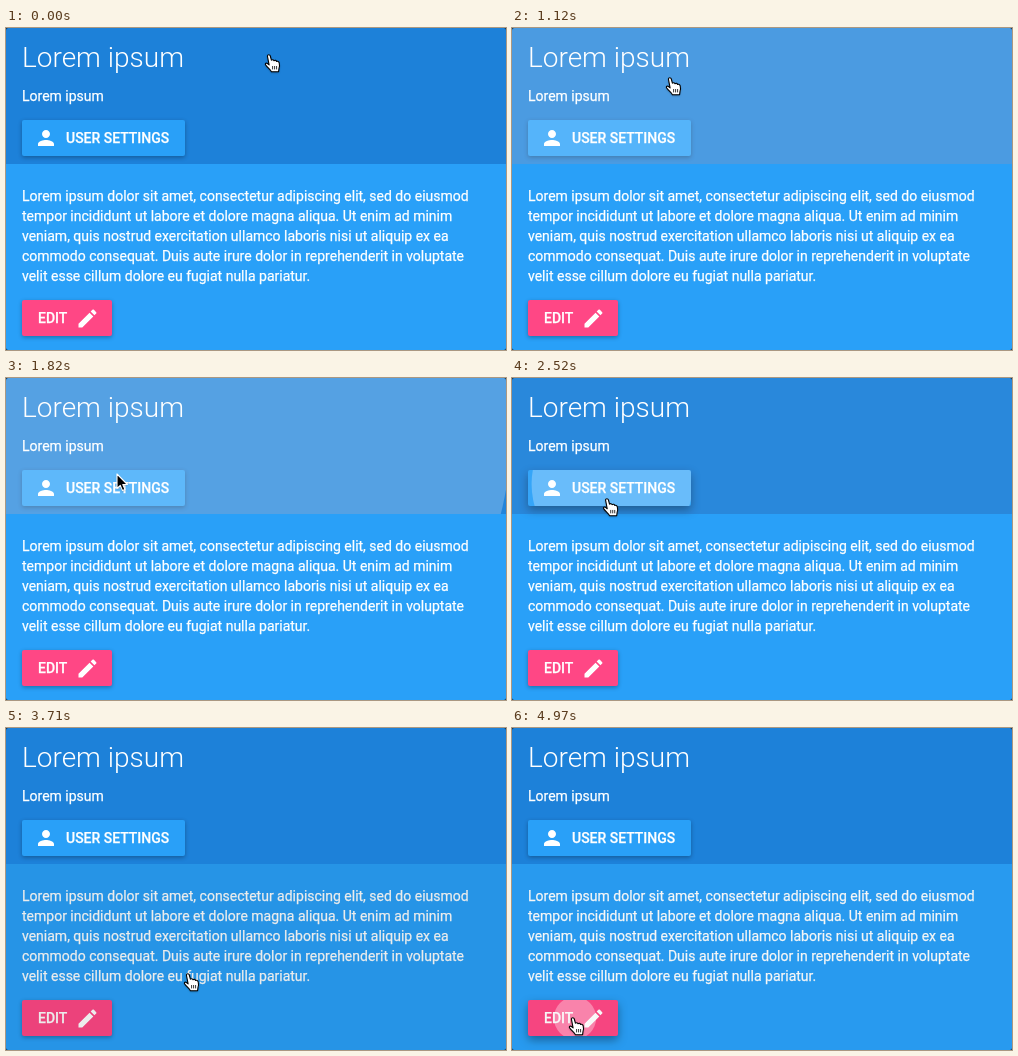
An HTML page with a canvas for the animation above (5.04 s loop, 500x322 px).

```html
<!DOCTYPE html>
<html lang="en">
<head>
<meta charset="utf-8">
<title>Ink ripples</title>
<style>
html, body { margin: 0; width: 500px; height: 322px; overflow: hidden; background: #16324a; }
canvas { display: block; }
</style>
</head>
<body>
<canvas id="stage" width="500" height="322"></canvas>
<script>
const ctx = document.getElementById('stage').getContext('2d');
const LOOP = 5040, STEP = 70, GROW = 650, FADE = 1500;

const header = { x: 0, y: 0, w: 500, h: 136, color: '#1d81d9' };
const body = { x: 0, y: 136, w: 500, h: 186, color: '#29a0f8' };
const userButton = { x: 16, y: 92, w: 163, h: 36, color: '#29a0f8' };
const editButton = { x: 16, y: 272, w: 90, h: 36, color: '#ff4785' };

const light = { rgb: '255,255,255', alpha: 0.38 };
const dark = { rgb: '0,0,0', alpha: 0.13 };
const clicks = [
  { at: 420, box: header, x: 257, y: 31, ink: light },
  { at: 1240, box: header, x: 156, y: 51, ink: light },
  { at: 2030, box: userButton, x: 100, y: 106, ink: light },
  { at: 3090, box: body, x: 84, y: 157, ink: dark },
  { at: 3869, box: body, x: 173, y: 247, ink: dark },
  { at: 4790, box: editButton, x: 63, y: 290, ink: light }
];

// Pointer tip: time, x, y
const path = [
  [0, 263, 27], [210, 257, 31], [420, 257, 31], [1120, 158, 50], [1300, 155, 51],
  [1820, 111, 96], [2030, 100, 106], [2300, 100, 106], [2900, 84, 155], [3150, 84, 155],
  [3600, 182, 246], [3710, 182, 246], [3869, 172, 246], [4130, 172, 246],
  [4700, 61, 290], [LOOP, 61, 290]
];

const person = new Path2D('M12 12c2.21 0 4-1.79 4-4s-1.79-4-4-4-4 1.79-4 4 1.79 4 4 4z' +
  'm0 2c-2.67 0-8 1.34-8 4v2h16v-2c0-2.66-5.33-4-8-4z');
const pencil = new Path2D('M3 17.25V21h3.75L17.81 9.94l-3.75-3.75L3 17.25zM20.71 7.04c.39-.39.39-1.02 0-1.41' +
  'l-2.34-2.34c-.39-.39-1.02-.39-1.41 0l-1.83 1.83 3.75 3.75 1.83-1.83z');
const hand = new Path2D('M-1.6 1C-1.4-.7 .9-.6 1.3 1L2.4 5.2C3.2 4.4 4.6 4.6 5 5.7C5.9 5 7.3 5.3 7.6 6.5' +
  'C8.7 6 9.9 6.6 10.2 7.9C10.7 10 10.7 11.6 10 13.4L9.6 16.8H2.4C1.9 14.8-1.5 12.6-3.3 10' +
  'C-4.4 8.4-2.6 7.5-1.3 8.7L.1 9.8Z');
const knuckles = new Path2D('M3.6 11V14.4M5.6 11V14.4M7.6 11V14.4');
const arrow = new Path2D('M0 0V14.5L3.3 11.4L5.5 16.6L8 15.5L5.8 10.5H10.4Z');

const paragraph = [
  'Lorem ipsum dolor sit amet, consectetur adipiscing elit, sed do eiusmod',
  'tempor incididunt ut labore et dolore magna aliqua. Ut enim ad minim',
  'veniam, quis nostrud exercitation ullamco laboris nisi ut aliquip ex ea',
  'commodo consequat. Duis aute irure dolor in reprehenderit in voluptate',
  'velit esse cillum dolore eu fugiat nulla pariatur.'
];

const clamp = v => Math.max(0, Math.min(1, v));

function write(text, x, y, size = 14, weight = 400) {
  ctx.font = `${weight} ${size}px Roboto, sans-serif`;
  ctx.fillStyle = '#fff';
  ctx.fillText(text, x, y);
  if (weight === 300) return;
  ctx.strokeStyle = '#fff';
  ctx.lineWidth = 0.25;
  ctx.strokeText(text, x, y);
}

function icon(shape, x, y) {
  ctx.save();
  ctx.translate(x, y);
  ctx.fillStyle = '#fff';
  ctx.fill(shape);
  ctx.restore();
}

function button(box, t) {
  const age = t - clicks.find(c => c.box === box).at;
  const lift = clamp(age / 150) * clamp((850 - age) / 150);
  ctx.save();
  ctx.shadowColor = `rgba(0,0,0,${0.3 + 0.06 * lift})`;
  ctx.shadowBlur = 4 + 6 * lift;
  ctx.shadowOffsetY = 1.5 + 2.5 * lift;
  ctx.fillStyle = box.color;
  ctx.beginPath();
  ctx.roundRect(box.x, box.y, box.w, box.h, 2);
  ctx.fill();
  ctx.restore();
}

function ripples(box, t) {
  ctx.save();
  ctx.beginPath();
  ctx.roundRect(box.x, box.y, box.w, box.h, box.h < 40 ? 2 : 0);
  ctx.clip();
  for (const { at, x, y, ink } of clicks.filter(c => c.box === box)) {
    const age = t - at;
    if (age <= 0 || age >= FADE) continue;
    const reach = Math.hypot(Math.max(x - box.x, box.x + box.w - x), Math.max(y - box.y, box.y + box.h - y));
    ctx.fillStyle = `rgba(${ink.rgb},${ink.alpha * (1 - age / FADE)})`;
    ctx.beginPath();
    ctx.arc(x, y, reach * Math.sin(clamp(age / GROW) * Math.PI / 2), 0, 7);
    ctx.fill();
  }
  ctx.restore();
}

function pointer(t) {
  const i = path.findIndex(p => p[0] > t);
  const [t0, x0, y0] = path[i - 1], [t1, x1, y1] = path[i];
  const u = (t - t0) / (t1 - t0), k = u * u * (3 - 2 * u);
  const isArrow = t >= 1720 && t < 1900;
  const shape = isArrow ? arrow : hand;
  ctx.save();
  ctx.translate(x0 + (x1 - x0) * k, y0 + (y1 - y0) * k);
  ctx.lineJoin = 'round';
  ctx.shadowColor = 'rgba(0,0,0,.35)';
  ctx.shadowBlur = 2;
  ctx.shadowOffsetY = 1;
  ctx.fillStyle = isArrow ? '#000' : '#fff';
  ctx.fill(shape);
  ctx.shadowColor = 'transparent';
  ctx.strokeStyle = isArrow ? '#fff' : '#000';
  ctx.lineWidth = 1.1;
  ctx.stroke(shape);
  if (!isArrow) {
    ctx.lineWidth = 0.8;
    ctx.stroke(knuckles);
  }
  ctx.restore();
}

function draw(now) {
  const t = Math.floor(now % LOOP / STEP) * STEP;
  ctx.fillStyle = '#16324a';
  ctx.fillRect(0, 0, 500, 322);
  ctx.save();
  ctx.beginPath();
  ctx.roundRect(0, 0, 500, 322, 2.5);
  ctx.clip();
  for (const box of [header, body]) {
    ctx.fillStyle = box.color;
    ctx.fillRect(box.x, box.y, box.w, box.h);
  }

  write('Lorem ipsum', 16, 39, 28, 300);
  write('Lorem ipsum', 16, 73);
  button(userButton, t);
  icon(person, 28, 98);
  write('USER SETTINGS', 60, 115, 14, 500);
  ripples(userButton, t);
  ripples(header, t);

  paragraph.forEach((line, i) => write(line, 16, 173 + 20 * i));
  button(editButton, t);
  write('EDIT', 32, 295, 14, 500);
  icon(pencil, 69.5, 278.5);
  ripples(body, t);
  ripples(editButton, t);
  ctx.restore();

  pointer(t);
}

const start = performance.now();
function tick() {
  draw(performance.now() - start);
  requestAnimationFrame(tick);
}
tick();
</script>
</body>
</html>
```
